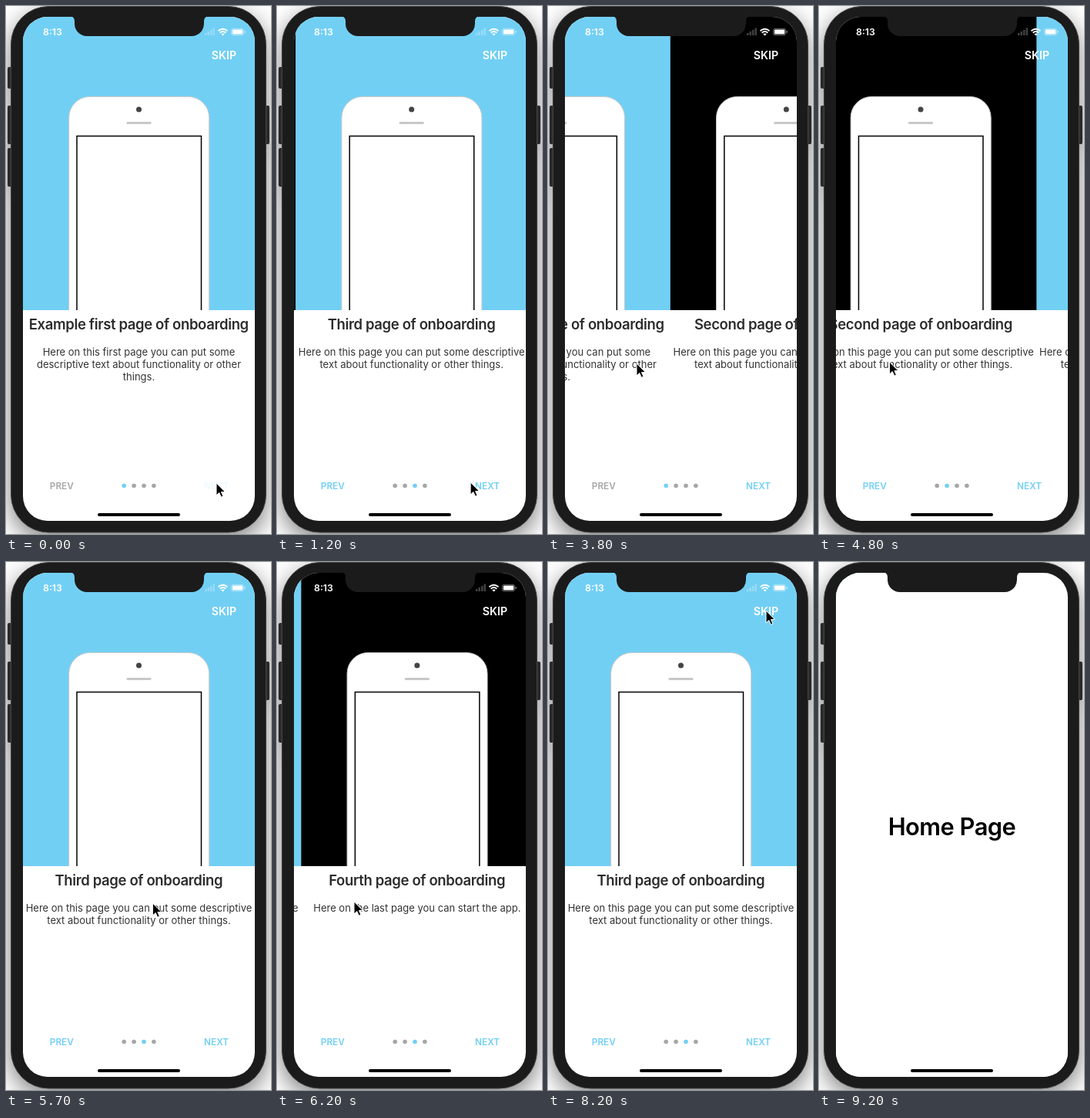
An HTML page for the animation above (10000 ms loop, 344 by 684 pixels).

```html
<!DOCTYPE html>
<html lang="en">
<head>
<meta charset="utf-8">
<title>Onboarding</title>
<style>
html, body { margin: 0; width: 100%; height: 100%; overflow: hidden; background: #fff; }
svg { display: block; width: 344px; height: 684px; font-family: Inter, Roboto, sans-serif; }
text { text-anchor: middle; white-space: pre; }
.body { filter: drop-shadow(0 10px 15px rgba(0, 0, 0, .5)); }
.title { font-size: 18.5px; font-weight: 600; letter-spacing: -.02em; fill: #2c2c2c; }
.copy { font-size: 13px; fill: #333; }
.nav { font-size: 11.8px; font-weight: 600; }
</style>
</head>
<body>
<svg viewBox="0 0 344 684">
  <defs>
    <clipPath id="screen"><rect x="22" y="14" width="301" height="653" rx="32"/></clipPath>
    <clipPath id="picture"><rect x="22" y="14" width="301" height="380"/></clipPath>
    <g id="phone" clip-path="url(#picture)">
      <rect x="81.7" y="117.5" width="182" height="340" rx="27" fill="#fff" stroke="#c9c9c9"/>
      <circle cx="172.5" cy="134" r="3.5" fill="#444"/>
      <rect x="156.5" y="150" width="32" height="3" rx="1" fill="#c8c8c8"/>
      <rect x="92" y="168.5" width="161.5" height="290" fill="#fff" stroke="#000" stroke-width="1.5"/>
    </g>
  </defs>

  <g class="body" fill="#2a2a2a">
    <rect x="2" y="79" width="8" height="28" rx="2"/>
    <rect x="2" y="129" width="8" height="50" rx="2"/>
    <rect x="2" y="184" width="8" height="50" rx="2"/>
    <rect x="334" y="129" width="8" height="50" rx="2"/>
    <rect x="6.5" y=".5" width="331" height="681.5" rx="49" fill="#1b1b1b" stroke="#484848"/>
  </g>

  <g clip-path="url(#screen)">
    <rect x="22" y="14" width="301" height="653" fill="#fff"/>
    <g id="intro">
      <g id="pages"></g>
      <g id="controls">
        <text id="skip" x="283" y="69" font-size="14.2" font-weight="600" fill="#fff">SKIP</text>
        <text id="prev" class="nav" x="72.3" y="626">PREV</text>
        <text id="next" class="nav" x="273" y="626" fill="#72cff4">NEXT</text>
        <g id="dots"></g>
      </g>
      <g id="start">
        <rect x="38" y="575" width="269" height="49" fill="#373a42"/>
        <text x="172.5" y="605" font-size="15" font-weight="500" fill="#fff">START</text>
      </g>
    </g>
    <g id="home">
      <rect x="22" y="14" width="301" height="653" fill="#fff"/>
      <text x="172.5" y="354.3" font-size="30.8" font-weight="600" letter-spacing="-.5">Home Page</text>
    </g>
    <g fill="#fff">
      <text x="60.5" y="38" font-size="12.3" font-weight="600">8:13</text>
      <path d="M258 35h2.5v3h-2.5zM261.5 33h2.5v5h-2.5zM265 31h2.5v7h-2.5zM268.5 28.5h2.5v9.500h-2.5z" opacity=".25"/>
      <g fill="none" stroke="#fff" stroke-width="1.9">
        <path d="M275.500 32.300Q281.500 27.200 287.500 32.300M277.700 34.700Q281.500 31.500 285.300 34.700"/>
      </g>
      <path d="M279.300 36.300Q281.500 34.700 283.700 36.300L281.500 38.400Z"/>
      <rect x="292.500" y="29.300" width="16" height="8.500" rx="2.300" fill="none" stroke="#fff" opacity=".4"/>
      <rect x="293.800" y="30.500" width="13.500" height="6" rx="1"/>
      <rect x="309.500" y="32" width="1.300" height="3" rx=".6" opacity=".5"/>
    </g>
  </g>

  <path d="M84 13.500Q89 14 89 20V23a16 16 0 0 0 16 16H241a16 16 0 0 0 16-16V20Q257 14 262 13.500Z" fill="#1b1b1b"/>
  <rect x="119" y="657" width="107" height="4" rx="2"/>
  <path id="cursor" d="M0 0V16L3.800 12.500L6.300 18.200L8.900 17.100L6.500 11.500H11.500Z" stroke="#fff"/>
</svg>
<script>
const LOOP = 10000, W = 301, BLUE = '#72cff4', GREY = '#a6a6a6';
const el = id => document.getElementById(id);
const clamp = v => Math.min(1, Math.max(0, v));
const linear = p => p;
const out = p => 1 - (1 - p) ** 3;
const inOut = p => p < .5 ? 4 * p ** 3 : 1 - 4 * (1 - p) ** 3;

const common = ['Here on this page you can put some descriptive', 'text about functionality or other things.'];
const pages = [
  ['Example first', ['Here on this first page you can put some', 'descriptive text about functionality or other', 'things.']],
  ['Second', common],
  ['Third', common],
  ['Fourth', ['Here on the last page you can start the app.']]
];
el('pages').innerHTML = pages.map(([name, lines], i) => `
  <g transform="translate(${i * W})">
    <rect x="22" y="14" width="${W + .3}" height="380" fill="${i % 2 ? '#000' : BLUE}"/>
    <use href="#phone"/>
    <text class="title" x="172.3" y="419">${name} page of onboarding</text>
    ${lines.map((s, n) => `<text class="copy" x="172.5" y="${453 + n * 16}">${s}</text>`).join('')}
  </g>`).join('');
el('dots').innerHTML = pages.map((_, i) => `<circle cx="${153.2 + i * 12.9}" cy="621.500" r="2.800"/>`).join('');

// Keys are [time, values, easing towards this key].
const scroll = [
  [0, [0]], [50, [0]], [450, [W], inOut],
  [850, [W]], [1250, [2 * W], inOut],
  [1950, [2 * W]], [2350, [W], inOut],
  [2750, [W]], [3150, [0], inOut],
  [3570, [0]], [3750, [95]], [4150, [W], out],
  [4600, [W]], [4800, [W + 40]], [4900, [W + 92]], [5250, [2 * W], out],
  [5800, [2 * W]], [5950, [2 * W + 120]], [6350, [3 * W], out],
  [7000, [3 * W]], [7300, [3 * W - 196]], [7650, [2 * W], out]
];
const pointer = [
  [0, [273, 618]], [1100, [273, 618]], [1200, [252, 617]], [1780, [82, 622], out],
  [3170, [82, 622]], [3420, [210, 465], inOut],
  [3570, [210, 465]], [3750, [115, 463]], [4150, [115, 463]], [4400, [132, 461], inOut],
  [4600, [132, 461]], [4800, [92, 461]], [4900, [40, 460]], [5250, [40, 460]],
  [5700, [190, 442]], [5780, [220, 440]], [5800, [220, 440]], [5950, [100, 440]],
  [6350, [100, 440]], [6600, [150, 440], inOut],
  [7000, [150, 440]], [7300, [346, 440]], [7900, [346, 440]],
  [8000, [297, 95]], [8200, [283, 63], out]
];
const indexChanges = [[0, 0], [400, 1], [1150, 2], [2300, 1], [3100, 0], [4120, 1], [5230, 2], [6330, 3], [7630, 2]];

function track(keys, t) {
  const n = keys.findIndex(k => k[0] > t);
  if (n < 0) return keys[keys.length - 1][1];
  const [t0, a] = keys[n - 1], [t1, b, ease = linear] = keys[n];
  const p = ease((t - t0) / (t1 - t0));
  return a.map((v, i) => v + (b[i] - v) * p);
}

// A tapped label dims at once, holds briefly, then fades back.
const tapOpacity = (t, ...taps) => Math.min(...taps.map(at =>
  t < at ? 1 : .12 + .88 * clamp((t - at - 100) / 250)));
const move = (id, x, y = 0) => el(id).setAttribute('transform', `translate(${x} ${y})`);
const show = (id, on) => el(id).setAttribute('visibility', on ? 'visible' : 'hidden');

function draw(t) {
  const index = indexChanges.filter(c => c[0] <= t).pop()[1];
  move('pages', -track(scroll, t)[0]);
  move('cursor', ...track(pointer, t));
  show('cursor', t < 8900);
  show('controls', index < 3);
  show('start', index === 3);
  [...el('dots').children].forEach((dot, i) => dot.setAttribute('fill', i === index ? BLUE : GREY));
  el('prev').setAttribute('fill', index ? BLUE : GREY);
  el('next').setAttribute('opacity', tapOpacity(t, 0, 800));
  el('prev').setAttribute('opacity', tapOpacity(t, 1900, 2700));
  el('skip').setAttribute('opacity', tapOpacity(t, 8500));
  const push = out(clamp((t - 8600) / 550));
  move('intro', -.3 * W * push);
  move('home', W * (1 - push));
  show('home', push > 0);
}

const began = performance.now();
function frame() {
  draw((performance.now() - began) % LOOP);
  requestAnimationFrame(frame);
}
frame();
</script>
</body>
</html>
```
